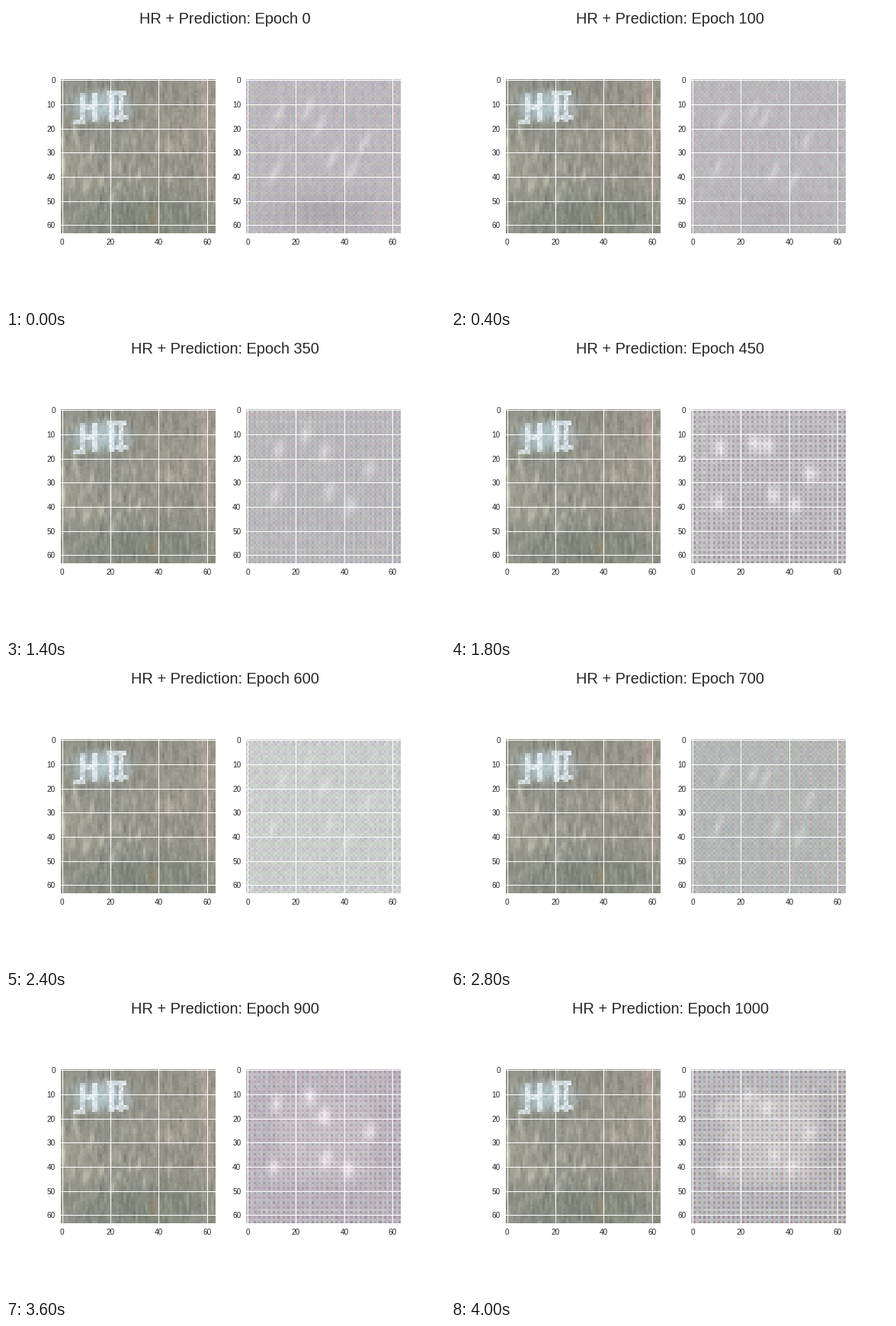
Recreate the animation shown at these times as a matplotlib script. Size 576 px wide and 396 px high, loop 4200 ms.

```python
import numpy as np
import matplotlib.pyplot as plt
from matplotlib.animation import FuncAnimation

FRAMES, INTERVAL, EPOCH_STEP = 21, 200, 50
SIZE = 64
ROW, COL = np.mgrid[0:SIZE, 0:SIZE].astype(float)
EDGE = np.minimum(np.minimum(ROW, COL), SIZE - 1 - np.maximum(ROW, COL))

plt.rcParams.update({
    "font.family": "Liberation Sans",
    "font.size": 10,
    "text.color": ".15",
    "xtick.color": ".15",
    "ytick.color": ".15",
})


def blob(x, y, width, height, slant=0.0):
    """Soft oval centred on column x, row y; positive slant leans right."""
    dy = ROW - y
    dx = COL - x + slant * dy
    return np.exp(-(dx / width) ** 2 - (dy / height) ** 2)


def tint(mask, color):
    return mask[..., None] * np.array(color, float)


def streaky_noise(rng, length):
    noise = rng.normal(size=(SIZE, SIZE))
    return sum(np.roll(noise, k, 0) for k in range(length)) / length ** 0.5


def lettering():
    """Four stems joined by short bars, as opacity."""
    mask = np.zeros((SIZE, SIZE))
    for x in (8, 13, 20, 24):
        mask[6:18, x:x + 2] = 0.65
    for y, x, width in ((11, 9, 4), (5, 19, 8), (17, 5, 5), (15, 22, 6)):
        mask[y:y + 2, x:x + width] = 0.7
    return mask


def ground_image():
    rng = np.random.default_rng(5)
    img = np.full((SIZE, SIZE, 3), (145, 146, 136), float)
    img += tint(blob(48, 22, 18, 30), (9, 5, 4))
    img += tint(blob(6, 38, 10, 13), (14, 12, 10))
    img += tint(blob(36, 57, 26, 10), (-17, -11, -14))
    img += tint(blob(59.5, 18, 2.6, 34, -0.04), (25, 15, 15))
    img += tint(blob(38, 57, 2, 4), (12, 1, -5))
    img += tint(streaky_noise(rng, 4), (7, 7, 6.5))

    # pale blades scattered over the middle, denser to the left
    for _ in range(24):
        x, y = 52 * rng.random() ** 1.3, rng.uniform(20, 50)
        img += tint(blob(x, y, 1.0, rng.uniform(2, 4)), (28, 27, 24))

    board = np.clip(2.2 * blob(16, 11, 14, 7) ** 0.5 - 1.1, 0, 1)
    img += tint(board, (20, 36, 50))
    white = lettering() * rng.uniform(0.6, 1.3, (SIZE, SIZE))
    white = np.clip(white + 0.22 * board * rng.random((SIZE, SIZE)), 0, 1)
    img += white[..., None] * (np.array([238, 248, 254]) - img)
    return np.clip(img, 0, 255) / 255


# Training mood at a few steps; everything between is interpolated.
KEY_STEPS = (0, 5, 9, 12, 14, 18, 20)
BRIGHTNESS = (188, 184, 187, 203, 181, 185, 182)
GREEN_SHIFT = (-4, 0, -3, 2, 2, -6, -2)
TEXTURE = (7, 7, 19, 9, 8, 16, 20)
GLOW = (24, 13, 40, 13, 20, 38, 22)

# places the network keeps lighting up, as (column, row)
ANCHORS = ((12, 16), (25, 12), (31, 17), (11, 37), (34, 36), (43, 40), (49, 26))


def prediction(step):
    rng = np.random.default_rng(40 + step)
    brightness, green, texture, glow = (
        np.interp(step, KEY_STEPS, values)
        for values in (BRIGHTNESS, GREEN_SHIFT, TEXTURE, GLOW))
    img = np.zeros((SIZE, SIZE, 3)) + (brightness, brightness + green,
                                       brightness + 1)

    # strided upsampling: dark cell in every 2x2, coloured 4x4 tile
    dots = 0.35 - 1.4 * (ROW % 2) * (COL % 2)
    checker = (ROW + COL) % 2 - 0.5
    strong = np.clip((texture - 6) / 12, 0, 1)
    weave = texture * (strong * dots + (1 - strong) * checker)
    tile = rng.normal(0, 4.5, (4, 4, 3))
    tile -= tile.mean(axis=(0, 1))
    pattern = weave[..., None] + np.tile(tile, (SIZE // 4, SIZE // 4, 1))
    img += pattern * np.where(EDGE < 3, 1.25, 1)[..., None]

    # weakly textured outputs leave leaning streaks, strong ones round spots
    slant = 0.45 * (1 - strong)
    width, height = 1.6 + strong, 4.5 - strong
    spots = sum(blob(x + rng.normal(0, 1), y + rng.normal(0, 1.5),
                     width, height, slant) for x, y in ANCHORS)
    img += tint(np.minimum(spots, 1.2), (glow,) * 3)

    # padding rim, early dark ground, late bright centre
    img += tint((EDGE == 5) * strong, (8, 10, 8))
    img -= tint(blob(32, 55, 22, 9), (15,) * 3) * max(0, 1 - step / 4)
    centre = np.exp(-((COL - 32) / 20) ** 8 - ((ROW - 28) / 19) ** 8)
    img += tint(centre, (18, 17, 15)) * np.clip((step - 15) / 5, 0, 1)

    img += tint(streaky_noise(rng, 3), (2.5,) * 3)
    return np.clip(img, 0, 255) / 255


fig, axes = plt.subplots(1, 2, figsize=(8, 5.5), dpi=72, facecolor="white")
fig.subplots_adjust(left=0.125, right=0.9, bottom=0.125, top=0.88, wspace=0.2)
title = fig.suptitle("", fontsize=20, x=0.4995, y=0.98)

axes[0].imshow(ground_image(), interpolation="nearest")
output = axes[1].imshow(prediction(0), interpolation="nearest")

for ax in axes:
    ax.set_axisbelow(True)
    ax.tick_params(length=0, pad=7)
    ax.spines[:].set_visible(False)
    ax.set_xticks(range(0, 61, 20))
    ax.set_yticks(range(0, 61, 10))
    ax.grid(True, color="white", linestyle="-", linewidth=1)


def update(step):
    title.set_text(f"HR + Prediction: Epoch {step * EPOCH_STEP}")
    output.set_data(prediction(step))
    return title, output


anim = FuncAnimation(fig, update, frames=FRAMES, init_func=lambda: update(0),
                     interval=INTERVAL, repeat=True, repeat_delay=0)
plt.show()
```
